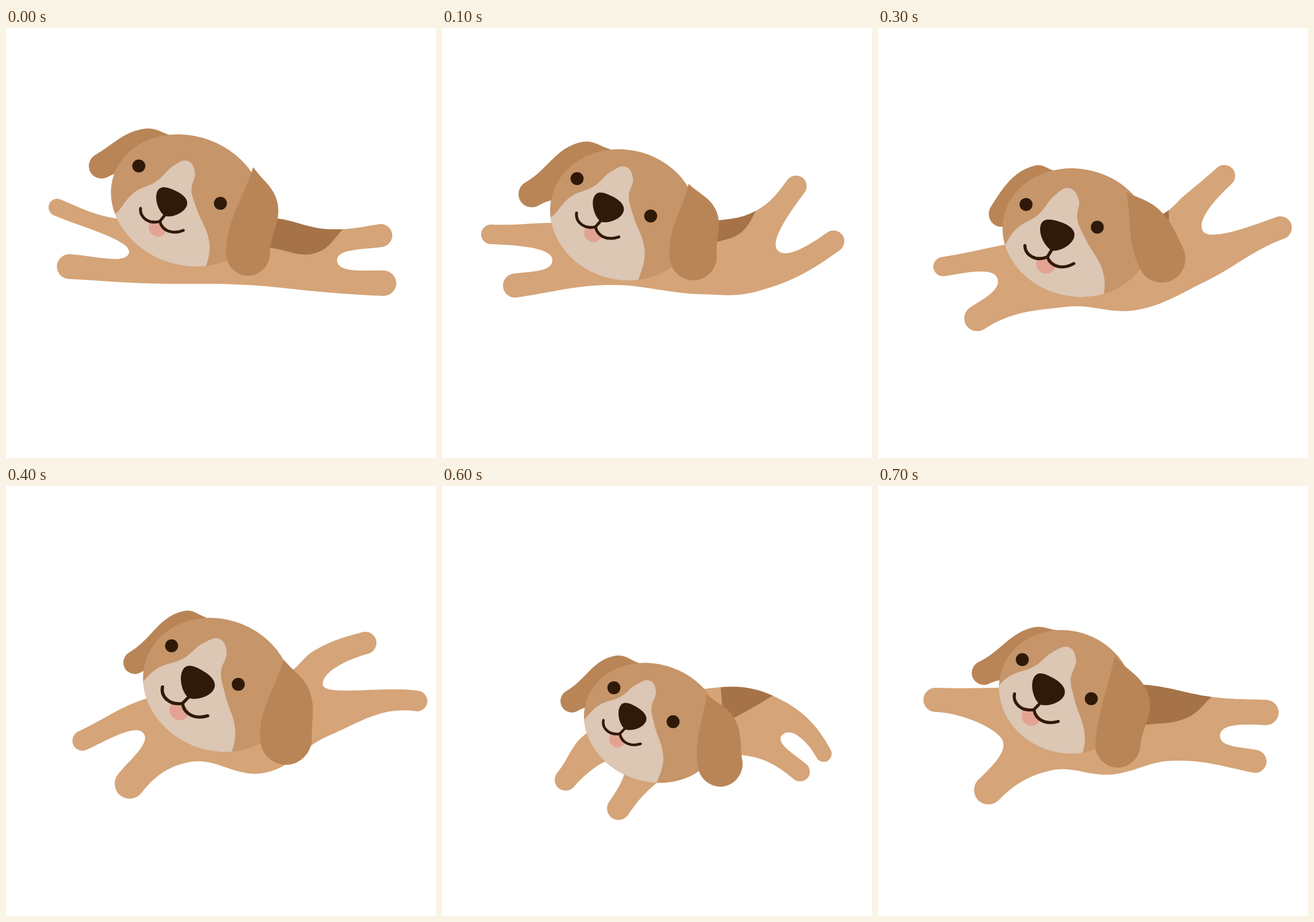
These frames come from a looping animation (748 px wide and 748 px high, 800 ms). An HTML page:

```html
<!DOCTYPE html>
<html lang="en">
<head>
<meta charset="utf-8">
<title>Swimming puppy</title>
<style>
  html, body { margin: 0; width: 100%; height: 100%; overflow: hidden; background: #fff; }
  svg { display: block; width: 100%; height: 100%; }
  .dark { fill: #2f1a09; }
  .ear { fill: #b98556; }
</style>
</head>
<body>
<svg viewBox="0 0 748 748">
  <defs>
    <clipPath id="inBody"><use href="#body"/></clipPath>
    <clipPath id="inHead"><use href="#head"/></clipPath>
  </defs>
  <path id="body" fill="#d5a478"/>
  <g clip-path="url(#inBody)"><path id="saddle" fill="#a57347"/></g>
  <path id="farEar" class="ear"/>
  <ellipse id="head" fill="#c69569"/>
  <g clip-path="url(#inHead)">
    <g id="face">
      <path id="muzzle" fill="#dcc6b4"/>
      <path fill="#e3a393" d="M-19,44C-20,60 -12,68 -1,68C12,68 17,56 14,46L-3,40Z"/>
      <path fill="none" stroke="#2f1a09" stroke-width="5.2" stroke-linecap="round"
        d="M-45,33C-40,48 -20,54 -3,40C8,54 28,53 43,37M1,24L-3,40"/>
      <path class="dark" d="M-30,-8C-30,-22 -14,-23 0,-23C16,-23 30,-18 30,-5C30,10 12,26 2,27C-10,27 -30,8 -30,-8Z"/>
    </g>
  </g>
  <circle id="eyeL" class="dark" r="11.3"/>
  <circle id="eyeR" class="dark" r="11.3"/>
  <path id="nearEar" class="ear"/>
</svg>
<script>
const STEP = 100;
const el = id => document.getElementById(id);

// Rounded ends (paws, ear tips) are [x, y, direction in degrees, radius].
// legs: upper front, lower front, lower rear, upper rear.
// head: [cx, cy, rx, ry, tilt]; nose: [x, y, scale]; ears: root, bulge, tip.
const stretch = {
  legs: [[89, 312, 203, 15], [110, 415, 183, 21.5], [657, 444, 2, 22], [652, 361, -9, 20]],
  gaps: [[214, 391], [576, 405]], shoulder: [190, 331],
  belly: [[240, 444], [420, 447], [560, 460]], back: [[560, 350], [468, 331]],
  saddle: [[592, 344], [540, 391], [458, 382]],
  head: [315, 300, 135, 112, 20], eyes: [[231, 240], [373, 305]], nose: [286, 303, 0.95],
  farEar: [[288, 187], [243, 175], [166, 240, 150, 22]],
  nearEar: [[430, 242], [472, 303], [421, 393, 90, 38]]
};
const kick = {
  legs: [[85, 359, 182, 17], [127, 448, 172, 21], [681, 371, -36, 19], [616, 275, -53, 18.5]],
  gaps: [[192, 403], [584, 387]], shoulder: [188, 339],
  belly: [[290, 447], [450, 463], [545, 459]], back: [[548, 317], [470, 336]],
  saddle: [[550, 312], [520, 356], [470, 375]],
  head: [316, 325, 129, 113, 15], eyes: [[235, 262], [363, 327]], nose: [287, 313, 0.96],
  farEar: [[293, 211], [245, 198], [156, 289, 150, 23]],
  nearEar: [[429, 271], [477, 318], [437, 398, 85, 41]]
};
const dive = {
  legs: [[93, 387, 188, 16], [130, 492, 165, 19], [685, 321, -48, 22], [580, 241, -70, 18.5]],
  gaps: [[176, 440], [579, 361]], shoulder: [197, 384],
  belly: [[340, 489], [450, 482], [575, 449]], back: [[533, 294], [497, 324]],
  saddle: [[533, 285], [518, 385], [436, 422]],
  head: [322.5, 366, 127, 108, 3], eyes: [[227, 336], [359, 348]], nose: [289, 377, 1],
  farEar: [[263, 267], [237, 261], [206, 340, 95, 25]],
  nearEar: [[381, 268], [450, 275], [500, 363, 40, 38]]
};
const reach = {
  legs: [[133, 443, 155, 17.5], [215, 518, 128, 26], [715, 374, 8, 18], [625, 273, -15, 19.5]],
  gaps: [[239, 430], [551, 345]], shoulder: [243, 370],
  belly: [[315, 481], [450, 499], [560, 435]], back: [[535, 287], [490, 325]],
  saddle: [[480, 340], [480, 350], [470, 360]],
  head: [368, 346, 132, 114, 22], eyes: [[288, 278], [404, 345]], nose: [331, 343, 1.06],
  farEar: [[347, 228], [312, 217], [224, 307, 150, 20]],
  nearEar: [[483, 302], [528, 357], [487, 440, 88, 45]]
};
const crouch = {
  legs: [[215, 511, 130, 19], [307, 561, 125, 20], [623, 497, 40, 17], [664, 466, 62, 14]],
  gaps: [[312, 478], [593, 432]], shoulder: [249, 432],
  belly: [[380, 512], [450, 480], [530, 469]], back: [[576, 365], [456, 353]],
  saddle: [[580, 362], [545, 383], [490, 413]],
  head: [366, 412, 121, 102, 20], eyes: [[299, 351], [402, 410]], nose: [329, 402, 0.87],
  farEar: [[343, 308], [303, 295], [226, 374, 150, 20]],
  nearEar: [[460, 362], [509, 405], [484, 484, 80, 39]]
};
const glide = {
  legs: [[100, 372, 182, 21], [192, 529, 135, 25], [656, 479, 12, 20], [675, 394, 2, 22]],
  gaps: [[217, 443], [595, 433]], shoulder: [212, 351],
  belly: [[300, 495], [405, 502], [510, 478]], back: [[581, 367], [466, 346]],
  saddle: [[583, 364], [540, 402], [455, 417]],
  head: [327, 358, 118, 106, 20], eyes: [[251, 302], [371, 370]], nose: [294, 355, 1.02],
  farEar: [[312, 251], [270, 246], [184, 325, 155, 21]],
  nearEar: [[412, 296], [471, 365], [417, 451, 95, 39]]
};

function blend(a, b) {
  if (typeof a === 'number') return (a + b) / 2;
  if (Array.isArray(a)) return a.map((v, i) => blend(v, b[i]));
  return Object.fromEntries(Object.keys(a).map(k => [k, blend(a[k], b[k])]));
}

const poses = [stretch, kick, dive, blend(dive, reach), reach, blend(reach, crouch), crouch, glide];

const rad = deg => deg * Math.PI / 180;
const point = ([x, y]) => ({ x, y });
const heading = (a, b) => Math.atan2(b.y - a.y, b.x - a.x);

// Half circle: enter along the direction, turn at the end, come back.
function tip([x, y, deg, r]) {
  return [90, 0, -90].map(side => {
    const a = rad(deg + side);
    return { x: x + r * Math.cos(a), y: y + r * Math.sin(a), dir: rad(deg + side - 90) };
  });
}

const gap = ([x, y], legA, legB) => ({ x, y, dir: rad((legA[2] + legB[2]) / 2 - 90), reach: 22 });

// Smooth path through nodes; a node without a direction halves the turn there.
function curve(nodes, closed) {
  const n = nodes.length;
  const at = i => nodes[(i + n) % n];
  const dirs = nodes.map((p, i) => {
    if (p.dir !== undefined) return p.dir;
    if (!closed && i === 0) return heading(p, at(1));
    if (!closed && i === n - 1) return heading(at(i - 1), p);
    const a = heading(at(i - 1), p), b = heading(p, at(i + 1));
    return Math.atan2(Math.sin(a) + Math.sin(b), Math.cos(a) + Math.cos(b));
  });
  let d = `M${nodes[0].x},${nodes[0].y}`;
  for (let i = 0; i < (closed ? n : n - 1); i++) {
    const p = at(i), q = at(i + 1), s = dirs[i], e = dirs[(i + 1) % n];
    const len = 0.38 * Math.hypot(q.x - p.x, q.y - p.y);
    const h = Math.min(len, p.reach || len), k = Math.min(len, q.reach || len);
    d += `C${p.x + h * Math.cos(s)},${p.y + h * Math.sin(s)} `
      + `${q.x - k * Math.cos(e)},${q.y - k * Math.sin(e)} ${q.x},${q.y}`;
  }
  return d;
}

function set(id, attrs) {
  for (const key in attrs) el(id).setAttribute(key, attrs[key]);
}

function draw({ legs, gaps, shoulder, belly, back, saddle, head, eyes, nose, farEar, nearEar }) {
  const [cx, cy, rx, ry, tilt] = head;
  const [foreTop, foreLow, hindLow, hindTop] = legs;
  set('body', { d: curve([
    point(shoulder), ...tip(foreTop), gap(gaps[0], foreTop, foreLow), ...tip(foreLow),
    ...belly.map(point), ...tip(hindLow), gap(gaps[1], hindLow, hindTop), ...tip(hindTop),
    ...back.map(point)
  ], true) + 'Z' });
  set('saddle', { d: curve(saddle.map(point)) + `L${cx + 115},${cy - 110}Z` });
  set('head', { cx, cy, rx, ry, transform: `rotate(${tilt} ${cx} ${cy})` });

  const [root, bulge, end] = farEar;
  set('farEar', { d: curve([point(root), point(bulge), ...tip(end), point(head)]) + 'Z' });
  const [nearRoot, nearBulge, nearEnd] = nearEar;
  set('nearEar', { d: curve([point(nearRoot), ...tip(nearEnd), point(nearBulge), point(nearRoot)]) + 'Z' });

  const [left, right] = eyes.map(point);
  set('eyeL', { cx: left.x, cy: left.y });
  set('eyeR', { cx: right.x, cy: right.y });
  const turn = heading(left, right) * 180 / Math.PI;
  set('face', { transform: `translate(${nose[0]} ${nose[1]}) rotate(${turn}) scale(${nose[2]})` });
}

const blaze = [[112, 100], [97, 40], [48, -10], [26, -36], [17, -70], [-3, -82],
  [-22, -64], [-39, -24], [-68, 12], [-80, 55]];
set('muzzle', { d: curve(blaze.map(point)) + 'L-120,130L0,160Z' });

let shown = -1;
const start = performance.now();
function tick() {
  const index = Math.floor((performance.now() - start) / STEP) % poses.length;
  if (index !== shown) draw(poses[shown = index]);
  requestAnimationFrame(tick);
}
tick();
</script>
</body>
</html>
```
